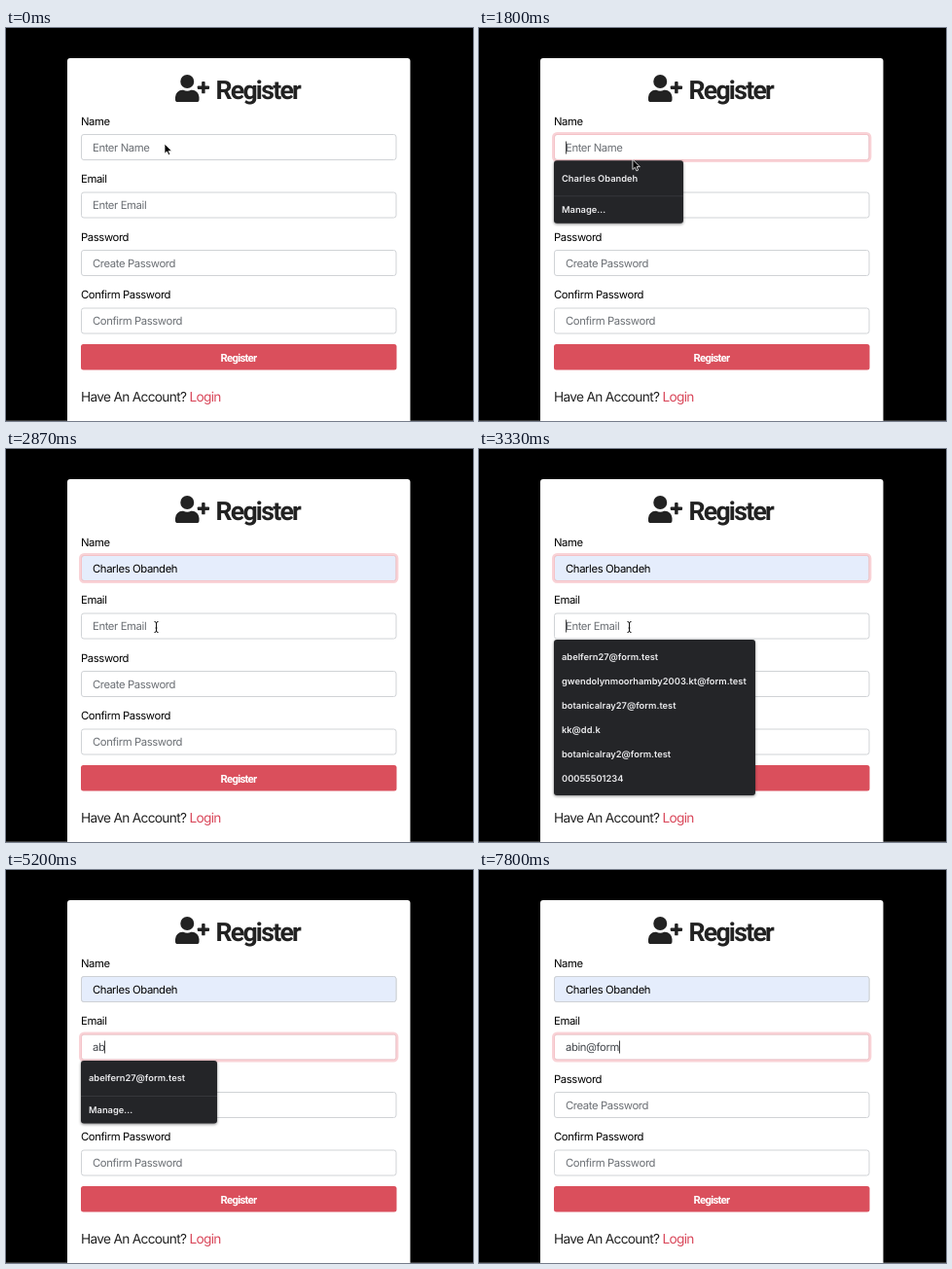
Recreate the animation shown at these times as an HTML page. Size 480 by 404 pixels, loop 8000 ms.

```html
<!DOCTYPE html>
<html lang="en">
<head>
<meta charset="utf-8">
<title>Register form</title>
<style>
  html, body { margin: 0; width: 100%; height: 100%; overflow: hidden; background: #000 }
  svg { display: block; width: 480px; height: 404px }
  text { font: 11.3px Inter, "Liberation Sans", sans-serif; letter-spacing: -.035em; white-space: pre; text-rendering: geometricPrecision }
  .hint { fill: #6b6f74 }
  .typed { fill: #44484d }
  .lead { font-size: 13.7px; letter-spacing: -.05em; fill: #222 }
  .title, .action { font: 700 26.6px Roboto, "Open Sans", sans-serif; letter-spacing: -.065em; fill: #222 }
  .action { font-size: 11.3px; fill: #fff; text-anchor: middle }
  .menu rect { fill: #242528 }
  .menu text { font-size: 9.3px; font-weight: 600; letter-spacing: 0; fill: #ececee }
  .menu .hover { fill: #3b3c40 }
  .menu line { stroke: #36373b }
  .shade { filter: drop-shadow(0 1px 1.5px #0007) }
  .preview { font: 9.3px "Liberation Sans", Arial, sans-serif; letter-spacing: 0 }
  .box { fill: #fff; stroke: #d0d3d6 }
  .ring rect { fill: none; stroke: #f4c3c8 }
  .ring .glow { stroke: #f9d3d7; stroke-width: 2.4 }
</style>
</head>
<body>
<svg viewBox="0 0 480 404">
  <path d="M0 403.5H480" stroke="#3a3a3a"/>
  <path d="M63 404V34q0-3 3-3H412.5q3 0 3 3V404z" fill="#fff"/>

  <g transform="translate(174 48) scale(.0547)" fill="#222">
    <circle cx="224" cy="128" r="128"/>
    <path d="M134 288h17q73 32 146 0h17a134 134 0 0 1 134 134v42a48 48 0 0 1-48 48H48a48 48 0 0 1-48-48v-42a134 134 0 0 1 134-134z"/>
    <rect x="416" y="208" width="224" height="64" rx="16"/>
    <rect x="496" y="128" width="64" height="224" rx="16"/>
  </g>
  <text class="title" x="215.5" y="73">Register</text>

  <g id="fields"></g>
  <rect x="77.5" y="109.5" width="323.5" height="26" rx="2.5" fill="#e5edfc" stroke="#ced1d5" data-on="1930-8000"/>
  <text class="preview" x="89" y="127" data-on="1930-2330">Charles Obandeh</text>
  <text id="name" x="89" y="126.5" data-on="2330-8000">Charles Obandeh</text>
  <text id="typed" class="typed" x="89" y="186"></text>

  <rect x="77" y="325" width="324.5" height="26.5" rx="2.5" fill="#da4f5c"/>
  <text class="action" x="239" y="343">Register</text>
  <text class="lead" x="77" y="383.5">Have An Account? <tspan fill="#d9475a">Login</tspan></text>

  <g id="rings"></g>
  <path id="caret" d="M.5 0V13" stroke="#444" data-on="530-1000 1600-2870 3330-3870 4330-4870 5000-6000 6530-7130 7400-8000"/>

  <g id="menus"></g>

  <g id="pointer">
    <path id="arrow" d="M0 0V10.2L2.4 8 4 11.6 5.7 10.8 4.2 7.4H7.4z" stroke="#fff" stroke-width=".8"/>
    <path id="beam" d="M-2-5.5Q0-5.5 0-4V4Q0 5.5-2 5.5M2-5.5Q0-5.5 0-4M0 4Q0 5.5 2 5.5M-1 1H1" fill="none" stroke="#111"/>
  </g>
</svg>
<script>
const $ = id => document.getElementById(id);
const LOOP = 8000, TICK = 0.015;

const fields = [
  ['Name', 'Enter Name', '0-1930'],
  ['Email', 'Enter Email', '0-5000'],
  ['Password', 'Create Password', '0-8000'],
  ['Confirm Password', 'Confirm Password', '0-8000']
];
$('fields').innerHTML = fields.map(([label, hint, on], i) => {
  const y = 109.5 + i * 59.5;
  return `<text x="77" y="${y - 9.7}">${label}</text>
    <rect class="box" x="77.5" y="${y}" width="323.5" height="26" rx="2.5"/>
    <text class="hint" x="89" y="${y + 17}" data-on="${on}">${hint}</text>`;
}).join('');

const ring = (id, y) => `<g id="${id}" class="ring">
  <rect class="glow" x="76.2" y="${y - 1.3}" width="326" height="28.6" rx="4"/>
  <rect x="77.5" y="${y}" width="323.5" height="26" rx="2.5"/></g>`;
$('rings').innerHTML = ring('nameRing', 109.5) + ring('mailRing', 169);

function menu(on, y, w, items, manage, hoverOn) {
  const h = manage ? 64.5 : 160;
  return `<g class="menu" data-on="${on}">
    <rect class="shade" x="77" y="${y}" width="${w}" height="${h}" rx="3"/>
    ${hoverOn ? `<rect class="hover" x="77" y="${y + 4}" width="${w}" height="29" data-on="${hoverOn}"/>` : ''}
    ${items.map((s, i) => `<text x="85" y="${y + 21.2 + i * 25}">${s}</text>`).join('')}
    ${manage ? `<line x1="77" x2="${77 + w}" y1="${y + 36.5}" y2="${y + 36.5}"/>
      <text x="85" y="${y + 54}">Manage...</text>` : ''}
  </g>`;
}
const mails = ['abelfern27@form.test', 'gwendolynmoorhamby2003.kt@form.test',
  'botanicalray27@form.test', 'kk@dd.k', 'botanicalray2@form.test', '00055501234'];
$('menus').innerHTML =
  menu('530-2270', 136.3, 133, ['Charles Obandeh'], true, '1930-2270') +
  menu('3330-5000', 196, 207, mails, false) +
  menu('5000-5330', 196, 140, mails.slice(0, 1), true);

const timed = [...document.querySelectorAll('[data-on]')].map(el =>
  [el, el.dataset.on.split(' ').map(s => s.split('-').map(Number))]);
const keys = [5000, 5200, 5270, 5530, 6670, 7400, 7530, 7670, 7800];
const path = [[0, 163, 119], [1540, 163, 119], [1800, 158, 135], [1930, 156, 142],
  [2400, 156, 142], [2870, 154.5, 183], [LOOP, 154.5, 183]];

const ramp = (t, a, b) => Math.min(1, Math.max(0, (t - a) / (b - a)));
const show = (el, on) => el.style.display = on ? '' : 'none';

function draw(ms) {
  const t = Math.floor((ms + 5) % LOOP * TICK) / TICK + 5;
  for (const [el, spans] of timed) show(el, spans.some(([a, b]) => t >= a && t < b));

  const mailFocus = ramp(t, 3340, 3530);
  $('nameRing').style.opacity = ramp(t, 530, 730) - mailFocus;
  $('mailRing').style.opacity = mailFocus;

  const typed = $('typed');
  typed.textContent = 'abin@form'.slice(0, keys.filter(k => t >= k).length);
  const atMail = t >= 3330;
  const width = atMail ? typed.getComputedTextLength()
    : t >= 2330 ? $('name').getComputedTextLength() : 0;
  $('caret').setAttribute('transform', `translate(${Math.round(89 + width)} ${atMail ? 175.5 : 116.5})`);

  const next = path.findIndex(p => t < p[0]);
  const [a, x, y] = path[next - 1], [b, x2, y2] = path[next];
  const k = ramp(t, a, b), py = y + (y2 - y) * k;
  $('pointer').setAttribute('transform', `translate(${x + (x2 - x) * k} ${py})`);
  show($('pointer'), t < 4930);
  show($('arrow'), py < 168);
  show($('beam'), py >= 168);
}

const start = performance.now();
(function frame() {
  draw(performance.now() - start);
  requestAnimationFrame(frame);
})();
</script>
</body>
</html>
```
